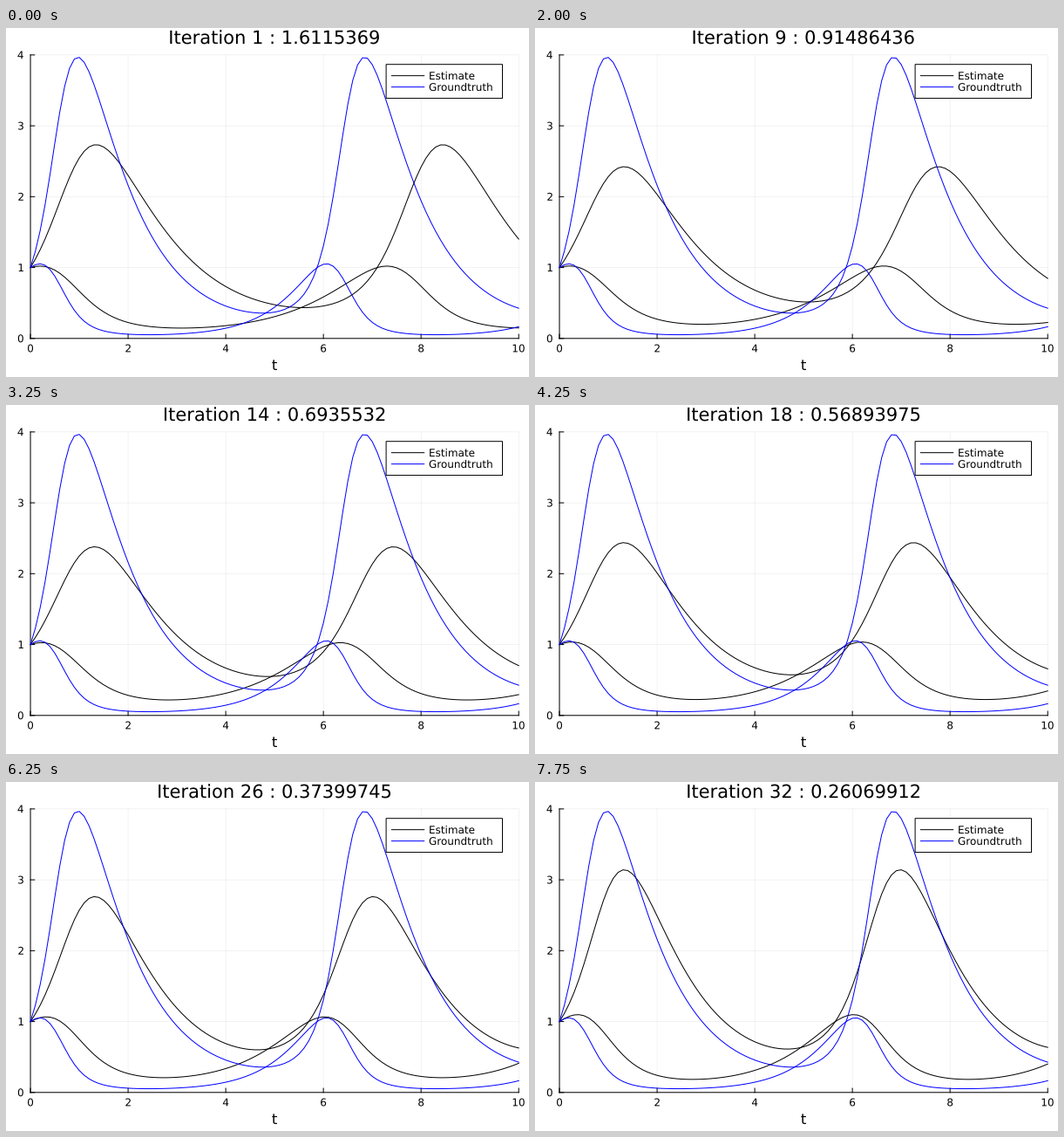
These frames come from a looping animation (600 px wide and 400 px high, 8 s). A matplotlib script:

```python
import numpy as np
import matplotlib.pyplot as plt
from matplotlib.animation import FuncAnimation
from matplotlib.patches import PathPatch, Rectangle
from matplotlib.path import Path
from matplotlib.textpath import TextPath

plt.rcParams["font.family"] = "DejaVu Sans"

STEPS = 32
PX = 0.72  # points per pixel at 100 dpi
LEFT, RIGHT, TOP, BOTTOM = 28.04, 588.19, 30.87, 355.80
MIDDLE = (LEFT + RIGHT) / 2
TIMES = np.linspace(0, 10, 101)

# Training progress at a few iterations: loss and the four model rates
KNOTS = np.array([1, 4, 9, 14, 22, 26, 32])
LOSS = [1.6115369, 1.2955301, 0.91486436, 0.6935532, 0.46975344, 0.37399745, 0.26069912]
GROWTH = [1.0, 1.03, 1.08, 1.132, 1.201, 1.238, 1.282]
PREDATION = [0.8, 0.83, 0.877, 0.907, 0.892, 0.8735, 0.829]
FEEDING = [2.0, 1.97, 1.939, 1.952, 2.014, 2.064, 2.117]
DEATH = [0.9, 0.93, 0.977, 1.020, 1.071, 1.084, 1.083]


def smooth(values, at):
    """Cubic Hermite curve through the values at the knots."""
    v = np.array(values)
    slope = np.gradient(v, KNOTS, edge_order=2)
    i = np.clip(np.searchsorted(KNOTS, at, side="right") - 1, 0, len(KNOTS) - 2)
    width = KNOTS[i + 1] - KNOTS[i]
    s = (at - KNOTS[i]) / width
    return (v[i] * (1 + 2 * s) * (1 - s) ** 2 + v[i + 1] * s * s * (3 - 2 * s)
            + width * (slope[i] * s * (1 - s) ** 2 - slope[i + 1] * s * s * (1 - s)))


def solve(growth, predation, feeding, death, substeps=5):
    """Lotka-Volterra by RK4, all parameter sets at once."""
    def rate(u):
        prey, hunter = u
        return np.array([prey * (growth - predation * hunter),
                         hunter * (feeding * prey - death)])

    u = np.ones((2, len(growth)))
    h = (TIMES[1] - TIMES[0]) / substeps
    path = [u]
    for _ in TIMES[1:]:
        for _ in range(substeps):
            a = rate(u)
            b = rate(u + h / 2 * a)
            c = rate(u + h / 2 * b)
            d = rate(u + h * c)
            u = u + h / 6 * (a + 2 * b + 2 * c + d)
        path.append(u)
    return np.array(path)  # time, species, parameter set


def px(t):
    return LEFT + (RIGHT - LEFT) * t / 10


def py(v):
    return BOTTOM - (BOTTOM - TOP) * v / 4


iterations = np.arange(1, STEPS + 1)
losses = smooth(LOSS, iterations)
estimates = solve(*(smooth(p, iterations) for p in (GROWTH, PREDATION, FEEDING, DEATH)))
truth = solve(*np.array([[1.5], [1.0], [3.0], [1.0]]))[:, :, 0]

fig = plt.figure(figsize=(6, 4), dpi=100, facecolor="white")
ax = fig.add_axes([0, 0, 1, 1])
ax.set_xlim(0, 600)
ax.set_ylim(400, 0)
ax.axis("off")


def line(xs, ys, color="black", z=2, width=1, **kw):
    return ax.plot(xs, ys, color=color, lw=width * PX, zorder=z, snap=False, **kw)[0]


def outline(x, y, text, size, align):
    """Glyph outlines with the baseline at y, placed without pixel rounding."""
    glyphs = TextPath((0, 0), text, size=size)
    box = glyphs.get_extents()
    anchor = {"left": 0, "center": (box.x0 + box.x1) / 2, "right": box.x1}[align]
    return Path(glyphs.vertices * [1, -1] + [x - anchor, y], glyphs.codes)


def label(x, y, text, size=12, align="center"):
    patch = PathPatch(outline(x, y, text, size, align), fc="black", lw=0, zorder=6,
                      snap=False)
    return ax.add_patch(patch)


# Grid, ticks and axes
for t in range(0, 11, 2):
    line([px(t)] * 2, [TOP, BOTTOM], z=1, width=0.5, alpha=0.1)
    line([px(t)] * 2, [BOTTOM, BOTTOM - 4.72])
    label(px(t), 371.4, str(t))
for v in range(5):
    line([LEFT, RIGHT], [py(v)] * 2, z=1, width=0.5, alpha=0.1)
    line([LEFT, LEFT + 4.72], [py(v)] * 2)
    label(19.85, py(v) + 4.37, str(v), align="right")
line([LEFT, RIGHT], [BOTTOM] * 2)
line([LEFT] * 2, [TOP, BOTTOM])
label(MIDDLE, 392, "t", 16.5)

# Curves
fits = [line([], [], z=3) for _ in range(2)]
for species in range(2):
    line(px(TIMES), py(truth[:, species]), "blue", z=4)

# Legend
ax.add_patch(Rectangle((436.1, 41.7), 133.4, 38.88, fc="white", ec="black",
                       lw=PX, zorder=5, snap=False))
for y, name, color in ((54.66, "Estimate", "black"), (67.62, "Groundtruth", "blue")):
    line([442.4, 479.7], [y, y], color, z=6)
    label(485, y + 4.37, name, align="left")


def heading(frame):
    text = f"Iteration {frame + 1} : {np.float32(losses[frame])!s}"
    return outline(MIDDLE, 18.14, text, 21, "center")


title = ax.add_patch(PathPatch(heading(0), fc="black", lw=0, zorder=6, snap=False))


def draw(frame):
    for species, curve in enumerate(fits):
        curve.set_data(px(TIMES), py(estimates[:, species, frame]))
    title.set_path(heading(frame))
    return [*fits, title]


anim = FuncAnimation(fig, draw, frames=STEPS, interval=250, repeat=True,
                     repeat_delay=0, blit=False)
plt.show()
```
